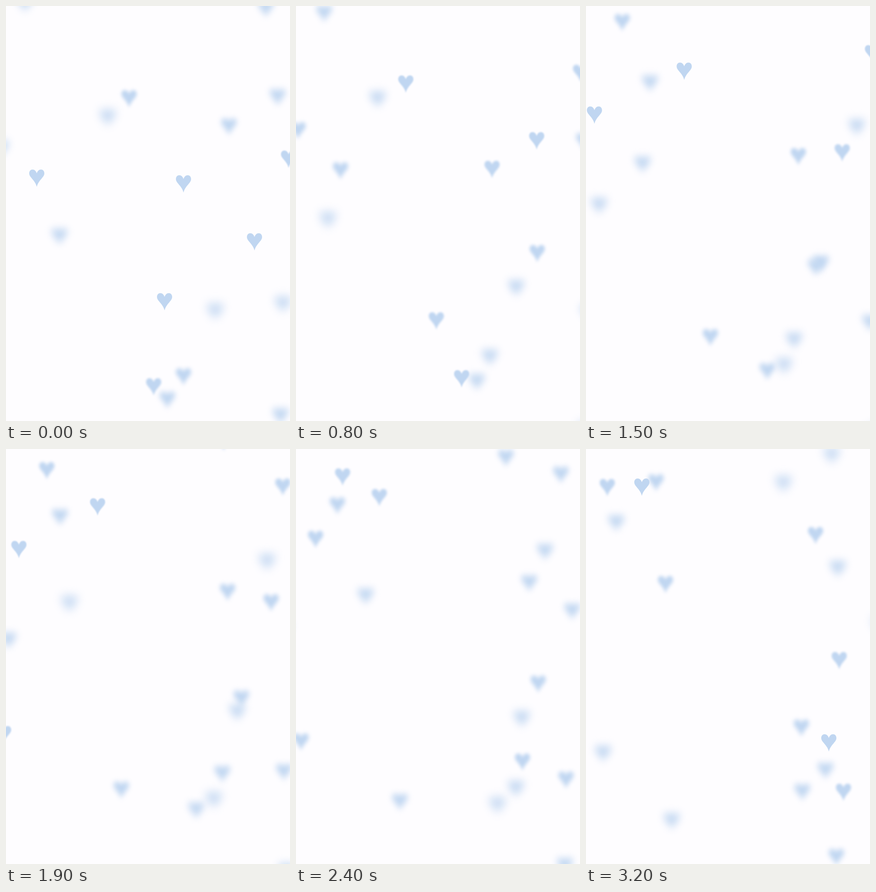
An HTML page for the animation above (3.3 s loop, 600x873 px).

```html
<!DOCTYPE html>
<html lang="en">
<head>
<meta charset="utf-8">
<title>Drifting hearts</title>
<style>
  html, body { margin: 0; width: 100%; height: 100%; overflow: hidden; background: #fefdff; }
  svg { display: block; width: 100%; height: 100%; }
</style>
</head>
<body>
<svg id="stage" viewBox="0 0 600 873" fill="#c0d6f1"></svg>
<script>
const LOOP = 3300, STEP = 100, TRAVEL = 3.2, MAX_BLUR = 10.5;
const HALF = 'C-2 10-7 5-11 0C-14.5-4-16-6.5-16-10C-16-15-13-18-9-18C-4.5-18-1.5-14.5 0-10';
const HEART = `M0 18.5${HALF}C1.5-14.5 4.5-18 9-18C13-18 16-15 16-10C16-6.5 14.5-4 11 0C7 5 2 10 0 18.5Z`;

// Each heart crosses its path at constant speed; the second value is when it is sharp.
// Its focus then swings evenly between sharp and soft, once per period.
const slow = { period: 8, hearts: [
  ['M260 195 148 71', 1.4],
  ['M215 235 45 81', 4.3],
  ['M375 374 532 252', 0],
  ['M442 643 535 445', 4.1],
  ['M335 622 181 783', -.1],
  ['M341 829 506 677', 5.8],
  ['M585 628 621 647 544 722', 4.3],
  ['M580 863 628 905 529 859', 5.2],
  ['M40 -5 118 80', 3.2],
  ['M113 485 -69 347', 4.9]
] };
const fast = { period: 4, hearts: [
  ['M65 362 134 326 168 285', -.05],
  ['M525 496 484 562 455 587', .15],
  ['M375 780 513 618', 3.15],
  ['M312 801 425 750 457 722', .45],
  ['M471 254 621 371', 1.1],
  ['M574 192 617 112 519 14', 1.3],
  ['M597 322 622 297 485 182', -.2],
  ['M549 6 482 -60 417 74', 1.3],
  ['M-11 300 22 219 64 156', 1.65],
  ['M-65 542 36 641', 1.6]
] };

const stage = document.getElementById('stage');

function svgPath(d) {
  const path = document.createElementNS('http://www.w3.org/2000/svg', 'path');
  path.setAttribute('d', d);
  return path;
}

const hearts = [slow, fast].flatMap(({ period, hearts }) =>
  hearts.map(([route, sharpAt]) => ({
    period, sharpAt,
    route: svgPath(route),
    shape: stage.appendChild(svgPath(HEART))
  })));

// Triangle wave from 0 to 1 and back over one unit.
const swing = u => 1 - Math.abs(1 - 2 * (u - Math.floor(u)));

function draw(t) {
  for (const { period, sharpAt, route, shape } of hearts) {
    const { x, y } = route.getPointAtLength(route.getTotalLength() * t / TRAVEL);
    const blur = MAX_BLUR * swing((t - sharpAt) / period);
    shape.setAttribute('transform', `translate(${x.toFixed(2)} ${y.toFixed(2)})`);
    shape.style.filter = blur > .3 ? `blur(${blur.toFixed(2)}px)` : 'none';
  }
}

const start = performance.now();
function tick() {
  const elapsed = (performance.now() - start) % LOOP;
  draw(Math.floor(elapsed / STEP) * STEP / 1000);
  requestAnimationFrame(tick);
}
tick();
</script>
</body>
</html>
```
